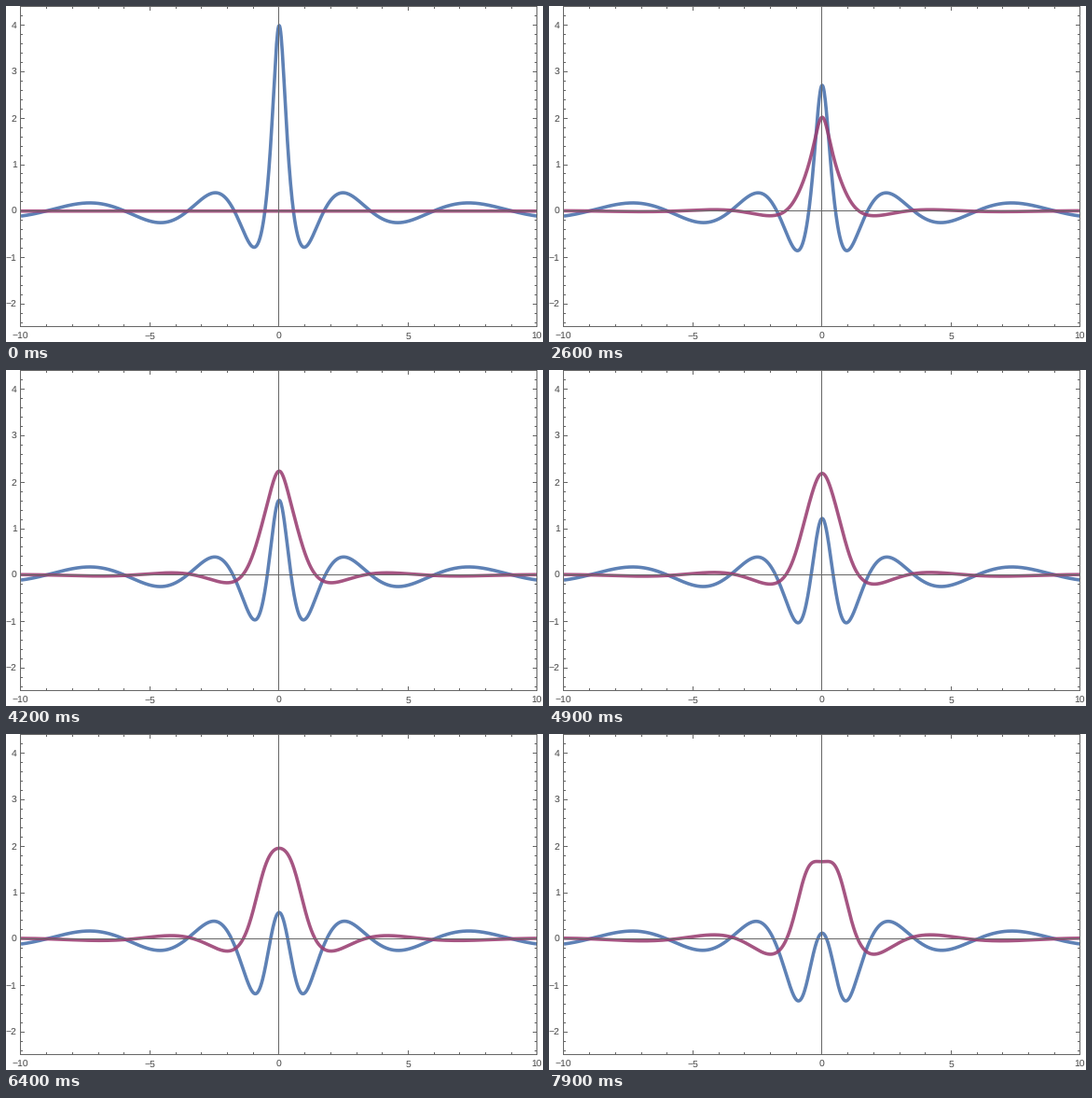
Recreate the animation shown at these times as a matplotlib script. Size 576 by 360 pixels, loop 8000 ms.

```python
import numpy as np
import matplotlib.pyplot as plt
from matplotlib.animation import FuncAnimation

W, H, DPI = 576, 360, 100
PT = 72 / DPI                       # one pixel in points
FRAMES, DT = 80, 0.005
LEFT, RIGHT, TOP, BOTTOM = 16, 570, 1, 344
YMIN, YMAX = -2.5, 4.4
GRAY, BLUE, PURPLE = "#666666", "#5e81b5", "#993d71"

plt.rcParams.update({"path.snap": False, "text.hinting": "none"})


def rk4(f, x, y, h):
    k1 = f(x, y)
    k2 = f(x + h / 2, y + h / 2 * k1)
    k3 = f(x + h / 2, y + h / 2 * k2)
    k4 = f(x + h, y + h * k3)
    return y + h / 6 * (k1 + 2 * k2 + 2 * k3 + k4)


# Self-similar focusing NLS wave: i psi_t + psi_xx / 2 + |psi|^2 psi = 0, psi(0, 0) = 4.

def centre_values():
    """psi and its phase factor b at x = 0 for every time step after zero."""
    def slope(t, y):
        psi, beta = y
        return np.array([(4 * np.exp(1j * beta) - psi) / (2 * t), abs(psi) ** 2])

    sub = 10
    h = DT / sub
    y = np.array([4 + 64j / 3 * h - 102.4 * h * h, 16 * h], dtype=complex)
    out = []
    for n in range(1, (FRAMES - 1) * sub + 1):
        if n % sub == 0:
            out.append((y[0], np.exp(1j * y[1])))
        y = rk4(slope, n * h, y, h)
    return np.array(out).T


def wave(xmax=10, steps=10000, keep=20):
    """Integrate outwards from x = 0 for all times at once."""
    t = DT * np.arange(1, FRAMES)

    def slope(x, y):
        psi, dpsi, b, s = y
        bend = -1j * (4 * b - psi - x * dpsi) / t
        d2psi = bend - 2 * (psi * psi.conj()) * psi
        return np.array([dpsi, d2psi, -2 * psi * s, 2 * (psi * b.conj()).real])

    psi0, b0 = centre_values()
    zero = np.zeros_like(psi0)
    y = np.array([psi0, zero, b0, zero])
    h = xmax / steps
    rows = [y[0]]
    for n in range(steps):
        y = rk4(slope, n * h, y, h)
        if (n + 1) % keep == 0:
            rows.append(y[0])
    half = np.array(rows).T
    start = (4 * half[0] - half[1]).real / 3    # real part is even in time
    half = np.vstack([start, half])
    x = np.linspace(0, xmax, half.shape[1])
    return np.r_[-x[:0:-1], x], np.hstack([half[:, :0:-1], half])


def px(x):
    return LEFT + (x + 10) * (RIGHT - LEFT) / 20


def py(y):
    return TOP + (YMAX - y) * (BOTTOM - TOP) / (YMAX - YMIN)


def crisp(v):
    """Centre of the pixel that ends at or holds v."""
    return np.ceil(v) - 0.5


fig = plt.figure(figsize=(W / DPI, H / DPI), dpi=DPI, facecolor="white")
ax = fig.add_axes([0, 0, 1, 1])
ax.set_xlim(0, W)
ax.set_ylim(H, 0)
ax.axis("off")


def rule(x0, y0, x1, y1):
    ax.plot([x0, x1], [y0, y1], color=GRAY, lw=PT, zorder=5,
            solid_capstyle="butt")


def label(x, y, value, ha):
    text = str(value).replace("-", "\u2212")
    ax.text(x, y, text, ha=ha, va="baseline", color="#444444",
            family="Liberation Sans", fontsize=10.4 * PT)


left, right, top, bottom = (crisp(v) for v in (LEFT, RIGHT, TOP, BOTTOM))
for x in (left, crisp(px(0)), right):
    rule(x, top, x, bottom)
for y in (top, crisp(py(0)), bottom):
    rule(left - 0.5, y, right + 0.5, y)

for i in range(-10, 11):
    x, size = crisp(px(i)), 4.5 if i % 5 == 0 else 2.5
    rule(x, bottom, x, bottom - size)
    rule(x, top, x, top + size)
    if i % 5 == 0:
        label(crisp(px(i)) - 0.3, 356.5, i, "center")

for i in range(-12, 22):
    y, size = crisp(py(i / 5)), 4.5 if i % 5 == 0 else 2.5
    rule(left, y, left + size, y)
    rule(right, y, right - size, y)
    if i % 5 == 0:
        label(11.7, py(i / 5) + 3.2, i // 5, "right")

xs, psi = wave()
style = dict(lw=3.6 * PT, solid_capstyle="butt", solid_joinstyle="round")
real_line, = ax.plot([], [], color=BLUE, zorder=2, **style)
imag_line, = ax.plot([], [], color=PURPLE, alpha=0.88, zorder=3, **style)


def draw(k):
    real_line.set_data(px(xs), py(psi[k].real))
    imag_line.set_data(px(xs), py(psi[k].imag))
    return real_line, imag_line


anim = FuncAnimation(fig, draw, frames=FRAMES, interval=100, repeat=True,
                     repeat_delay=0)
plt.show()
```
